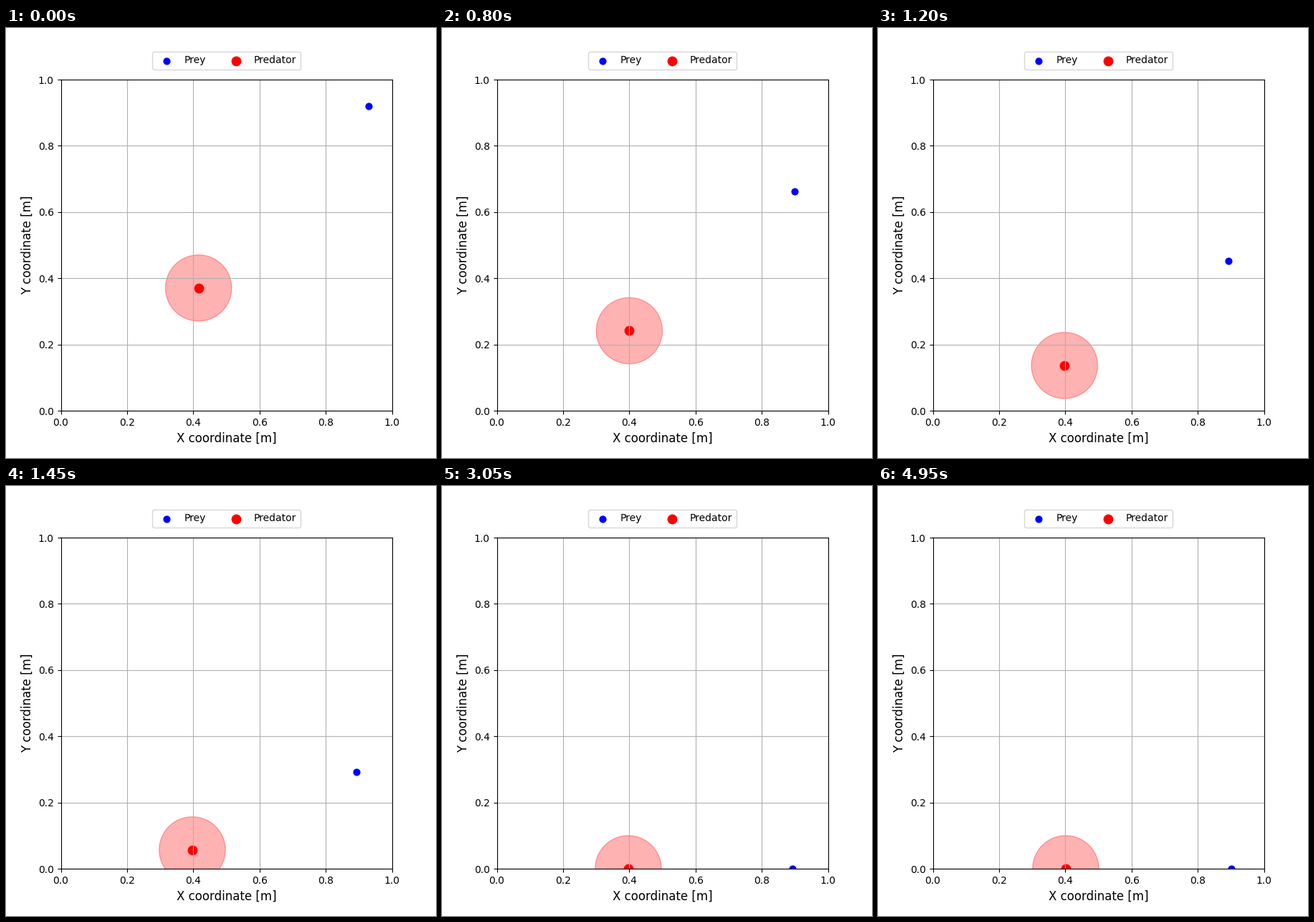
A matplotlib script for the animation above (5 s loop, 600 by 600 pixels).

```python
import matplotlib.pyplot as plt
import numpy as np
from matplotlib.animation import FuncAnimation

FRAMES = 100
INTERVAL = 50
FALL_STEPS = 38
PREY_START = np.array([0.9301, 0.9195])
PREDATOR_START = np.array([0.416, 0.3706])
RADIUS = 0.1

# Smooth accelerating fall through a few key heights
FALL = np.polyfit([0, 8, 16, 24, 33], [0, 0.1064, 0.258, 0.468, 0.768], 4)


def drift(t):
    """Fast ease to the left, then a slow return to the right."""
    return 0.041 * (np.exp(-t / 10.7) - 1) + 0.012 * (t / FRAMES) ** 3


def shift(t):
    return np.array([drift(t), -np.polyval(FALL, min(t, FALL_STEPS))])


fig, ax = plt.subplots(figsize=(6, 6), dpi=100)
ax.set_aspect("equal")
ax.set_xlim(0, 1)
ax.set_ylim(0, 1)
ax.set_xlabel("X coordinate [m]", fontsize=12)
ax.set_ylabel("Y coordinate [m]", fontsize=12)
ax.grid(True)

prey = ax.scatter(*PREY_START, s=40, color="blue", label="Prey")
predator = ax.scatter(*PREDATOR_START, s=80, color="red", label="Predator")
reach = plt.Circle(PREDATOR_START, RADIUS, color="red", alpha=0.3)
ax.add_patch(reach)
ax.legend(loc="upper center", bbox_to_anchor=(0.5, 1.1), ncol=2)


def update(t):
    move = shift(t)
    prey_pos = np.clip(PREY_START + move, 0, 1)
    # The predator moves at half the speed of the prey
    predator_pos = np.clip(PREDATOR_START + move / 2, 0, 1)
    prey.set_offsets([prey_pos])
    predator.set_offsets([predator_pos])
    reach.center = tuple(predator_pos)
    return prey, predator, reach


anim = FuncAnimation(fig, update, frames=FRAMES, interval=INTERVAL,
                     repeat=True, repeat_delay=0, blit=False)
plt.show()
```
